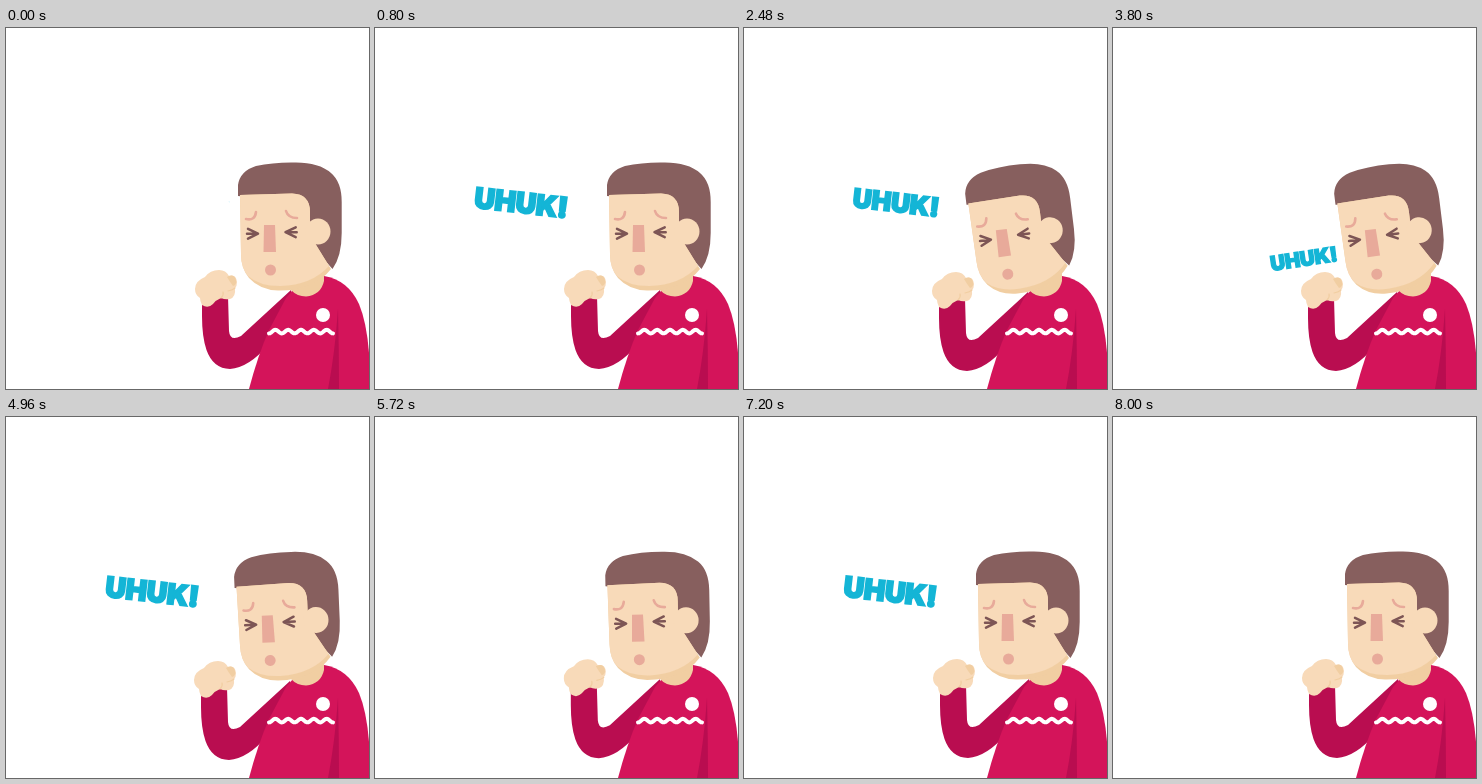
Write an HTML page with a canvas that moves like this. It is 363 px wide and 361 px high and loops after 8.04 s.

```html
<!DOCTYPE html>
<html lang="id">
<head>
<meta charset="utf-8">
<title>Uhuk</title>
<style>
html, body { margin: 0; width: 100%; height: 100%; overflow: hidden; background: #fff; }
canvas { display: block; }
</style>
</head>
<body>
<canvas id="stage" width="363" height="361"></canvas>
<script>
const ctx = document.getElementById('stage').getContext('2d');
const LOOP = 8040, COUGH = 2320;
const HAIR = '#875f5e', SKIN = '#f8dab9', SHADE = '#f1cea2', PINK = '#e8aa9a',
      EYE = '#7d5555', RED = '#d4145a', DARK = '#b90d50', BLUE = '#14b5d6';

// [time, amount] pairs of the nodding head and the arm that leads it
const HEAD = [[1720, 0], [2400, 1], [2560, 1], [3140, 0], [3740, 1], [3860, 1],
              [4460, 0], [4800, 0], [5200, 1], [5320, 1], [5860, 0]];
const ARM = [[1680, 0], [2340, 1], [2560, 1], [3140, 0], [3680, 1], [3900, 1],
             [4460, 0], [4880, 1], [5320, 1], [5880, 0]];

const WORDS = [
  { start: 0, life: 1000, size: 28.2, x: 146.3, y: 174.5, from: [224, 174], turn: 6.5 },
  { start: 1360, life: 960, size: 24.8, x: 179, y: 230.5, from: [244, 231], turn: -8.5 }
];

function pose(keys, t) {
  if (t <= keys[0][0]) return keys[0][1];
  for (let i = 1; i < keys.length; i++) {
    const [t0, a] = keys[i - 1], [t1, b] = keys[i];
    if (t < t1) return a + (b - a) * (1 - Math.cos(Math.PI * (t - t0) / (t1 - t0))) / 2;
  }
  return keys[keys.length - 1][1];
}

function fill(d, color) {
  ctx.fillStyle = color;
  ctx.fill(new Path2D(d));
}

function line(d, color, width) {
  ctx.strokeStyle = color;
  ctx.lineWidth = width;
  ctx.stroke(new Path2D(d));
}

function oval(x, y, rx, ry, color) {
  ctx.fillStyle = color;
  ctx.beginPath();
  ctx.ellipse(x, y, rx, ry, 0, 0, Math.PI * 2);
  ctx.fill();
}

function drawArm(k) {
  ctx.save();
  ctx.translate(-k, 2 * k);
  fill('M196 270 L222 268 L223 303 Q224 314 235 308 L285 262 L292 290 L262 317 Q243 339.5 224 341 Q207 340.5 200.5 322 Q196 309 196 288Z', DARK);
  fill('M189 261 Q189 253 199 249 Q204 242 213 242 Q220 242 223 248 Q230 246 231 254 Q231 258 229 260 Q230 269 224 271 Q219 272 215 270 Q210 272 207 276 Q202 281 196 277 Q194 273 194 270 Q189 267 189 261Z', SKIN);
  fill('M221 249 Q228 245 230 252 Q231 257 227 258 Q224 254 221 249Z', SHADE);
  line('M222 263 Q227 262 229 260 M215 270 Q218 267 217 264', SHADE, 1.2);
  ctx.restore();
}

function drawBody() {
  fill('M287 262 L318 248 Q342 252 353 276 Q363 300 364 345 L364 361 L243 361 Q252 327 263 302 L280 270Z', RED);
  fill('M332 281 Q333 322 333 361 L322 361 Q329 325 332 281Z', DARK);
  ctx.strokeStyle = '#fff';
  ctx.lineWidth = 4;
  ctx.beginPath();
  for (let x = 263; x <= 327; x++) ctx.lineTo(x, 303.6 + 1.8 * Math.cos((x - 263) / 12.8 * Math.PI * 2));
  ctx.stroke();
  oval(317, 287, 7, 7, '#fff');
  fill('M284 258 L318 238 L318 253 Q315 267 300 268.5 Q291 268.5 285 262Z', SHADE);
}

function drawHead(k) {
  ctx.save();
  ctx.translate(298, 250);
  ctx.rotate(-7 * k * Math.PI / 180);
  ctx.translate(-298, -250);
  fill('M232 168 L232 157 Q234 143 250 138 Q268 134 290 134.5 Q313 134.5 325 145 Q335.7 154 335.7 174 L335.7 205 Q335.7 228 326.5 241 L308 220 L300 175Z', HAIR);
  fill('M234 167 L286 165.5 Q304 166 304 184 L304 194 L309.5 216 L325 241 Q308 263 272 262.5 Q254 262 243 250 Q235 240 235 226Z', SHADE);
  fill('M234 167 L286 165.5 Q304 166 304 184 L304 194 L309.5 216 L323 238 Q306 257 274 258 Q253 258 242 248 Q235 240 235 226Z', SKIN);
  oval(312, 203.5, 12.5, 13, SKIN);
  line('M240 191 Q249 193 250 184 M280 183 Q282 190 291 190', PINK, 2.6);
  line('M242 200.8 L252 205.7 L242 210.6 M241 205.7 H251 M289.7 199.3 L279.5 204.2 L289.7 209.1 M280.5 204.2 H290.7', EYE, 2.5);
  fill('M258 197 L269 197 L270 224 L257.5 224Z', PINK);
  oval(264.5, 242, 5.5, 5.5, PINK);
  ctx.restore();
}

function drawWord(w, phase) {
  const age = phase - w.start;
  if (age <= 0 || age >= w.life) return;
  const rise = 1 - Math.pow(1 - Math.min(1, age / 280), 3);
  const fall = Math.pow(Math.max(0, (age - w.life + 160) / 160), 3);
  const scale = rise * (1 - fall);
  ctx.save();
  ctx.translate(...w.from);
  ctx.scale(scale, scale);
  ctx.translate(w.x - w.from[0], w.y - w.from[1]);
  ctx.rotate(w.turn * Math.PI / 180);
  ctx.font = `900 ${w.size}px Inter, Lato, sans-serif`;
  ctx.textAlign = 'center';
  ctx.fillStyle = ctx.strokeStyle = BLUE;
  ctx.lineWidth = w.size * 0.07;
  ctx.lineJoin = 'miter';
  ctx.fillText('UHUK!', 0, w.size * 0.364);
  ctx.strokeText('UHUK!', 0, w.size * 0.364);
  ctx.restore();
}

function draw(now) {
  const t = now % LOOP;
  ctx.fillStyle = '#fff';
  ctx.fillRect(0, 0, 363, 361);
  ctx.lineCap = 'round';
  ctx.lineJoin = 'round';
  drawArm(pose(ARM, t));
  drawBody();
  drawHead(pose(HEAD, t));
  WORDS.forEach(w => drawWord(w, t % COUGH));
}

let begin;
function tick() {
  const now = performance.now();
  if (begin === undefined) begin = now;
  draw(now - begin);
  requestAnimationFrame(tick);
}
tick();
</script>
</body>
</html>
```
